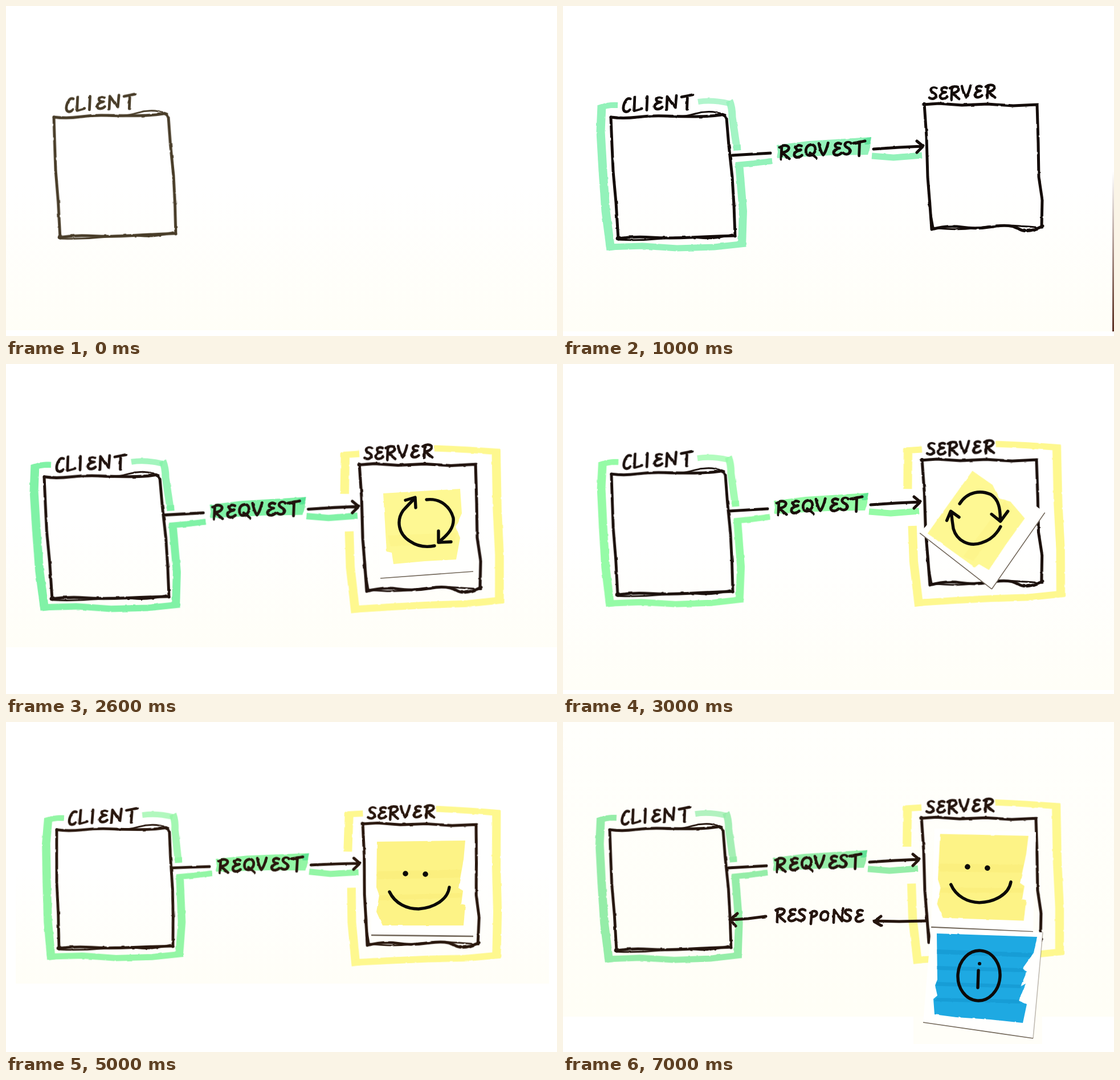
These frames come from a looping animation (967x579 px, 8 s). An HTML page:

```html
<!DOCTYPE html>
<html lang="en">
<head>
<meta charset="utf-8">
<title>Client and server</title>
<style>
  html, body { margin: 0; width: 100%; height: 100%; overflow: hidden; background: #fff; }
  svg { display: block; width: 100%; height: 100%; }
  path, ellipse { fill: none; stroke-linejoin: round; }
  .scene { visibility: hidden; animation: show 8s step-end infinite; }
  .scene.long { animation-name: showLong; }
  @keyframes show { 0% { visibility: visible; } 12.5%, 100% { visibility: hidden; } }
  @keyframes showLong { 0% { visibility: visible; } 25%, 100% { visibility: hidden; } }
  .ink { stroke: var(--ink); stroke-width: 5; stroke-linecap: round; filter: url(#rough); }
  .thin { stroke-width: 3; }
  .pen { stroke: #0c0a08; stroke-width: 5.4; stroke-linecap: round; }
  .marker { filter: url(#rough); }
  .green { stroke: var(--green); }
  .yellow { stroke: #fef88f; }
  .fill { stroke: none; }
  .sheet { fill: #fffffe; stroke: none; }
  .edge { stroke: #74695c; stroke-width: 1.6; }
</style>
</head>
<body>
<svg id="stage" viewBox="0 0 967 579" preserveAspectRatio="none">
  <defs>
    <filter id="rough" filterUnits="userSpaceOnUse" x="0" y="0" width="967" height="579" color-interpolation-filters="sRGB">
      <feTurbulence type="fractalNoise" baseFrequency=".08" numOctaves="2" seed="4"/>
      <feDisplacementMap in="SourceGraphic" scale="2.4" xChannelSelector="R" yChannelSelector="G"/>
    </filter>
    <linearGradient id="paper" x1="0" y1="0" x2="0" y2="1">
      <stop offset=".55" stop-color="#fff"/><stop offset="1" stop-color="#fffef7"/>
    </linearGradient>
    <linearGradient id="cream" x1="0" y1="0" x2="0" y2="1">
      <stop offset="0" stop-color="#fffffc"/><stop offset="1" stop-color="#fffef6"/>
    </linearGradient>
    <linearGradient id="fade" x1="0" y1="0" x2="0" y2="1">
      <stop offset="0" stop-color="#5a2f22" stop-opacity="0"/><stop offset="1" stop-color="#5a2f22"/>
    </linearGradient>
  </defs>
</svg>
<script>
// Hand lettering, one pen path per letter on a 26 unit high grid
const glyphs = {
  C: 'M16 2C11 0 8 3 5 10C2 18 2 25 8 26C12 26 14 24 16 22',
  L: 'M3 0L2 25L16 21',
  I: 'M2 0L1 25',
  E: 'M15 3C10 0 4 3 5 7C6 10 10 11 13 11C6 12 1 16 2 20C4 26 12 24 16 20',
  N: 'M1 26L2 2L17 23L19 0',
  T: 'M0 4L21 0M11 2L10 27',
  R: 'M4 2L3 26M0 4C8 -2 18 1 17 6C16 11 10 13 5 14L18 25',
  Q: 'M10 2C3 3 0 10 2 17C4 24 14 23 18 14C20 6 16 1 10 2M9 17L20 26',
  U: 'M0 1C2 10 4 18 8 22C12 18 15 8 17 0',
  V: 'M0 1C2 10 4 18 8 23C12 18 15 8 17 0',
  S: 'M14 3C8 -1 2 3 3 7C4 11 13 12 13 17C12 23 5 25 0 21',
  P: 'M3 6L1 29M0 7C8 2 14 5 12 11C10 15 5 15 2 16',
  O: 'M9 5C3 6 0 12 2 18C5 24 14 23 16 15C17 9 14 5 9 5'
};

const path = (cls, d, attrs = '') => `<path class="${cls}" d="${d}" ${attrs}/>`;
const ink = (d, cls = '') => path('ink ' + cls, d);
const stroke = (color, width, d, alpha = 1) =>
  path(color, d, `stroke-width="${width}" opacity="${alpha}"`);
const blob = (color, d, alpha = 1) => path('fill', d, `style="fill:${color}" opacity="${alpha}"`);
const group = (transform, body, cls = '') => `<g class="${cls}" transform="${transform}">${body}</g>`;

function word(text, xs, y, slope, size) {
  const letters = [...text].map((ch, i) => {
    const top = y + slope * (xs[i] - xs[0]);
    return `<path d="${glyphs[ch]}" transform="translate(${xs[i]} ${top}) scale(${size})"/>`;
  });
  return `<g class="ink" role="img" aria-label="${text}">${letters.join('')}</g>`;
}

// Affine map taking three points to three others
function fit(a, b) {
  const [ux, uy, vx, vy] = [a[2] - a[0], a[3] - a[1], a[4] - a[0], a[5] - a[1]];
  const det = ux * vy - uy * vx;
  const row = k => {
    const p = b[2 + k] - b[k], q = b[4 + k] - b[k];
    const m = (p * vy - q * uy) / det, n = (q * ux - p * vx) / det;
    return [m, n, b[k] - m * a[0] - n * a[1]];
  };
  const [r, s] = [row(0), row(1)];
  return `matrix(${[r[0], s[0], r[1], s[1], r[2], s[2]].map(v => v.toFixed(4))})`;
}
const square = ([x, y, p, q]) => [x, y, p, q, x + y - q, y + p - x];

const home = {
  client: [84, 195, 285, 192, 97, 409],
  server: [633, 171, 832, 173, 646, 392],
  wire: [297, 262, 632, 246]
};

const clientBox =
  ink('M84 195L86 245L88 290L93 345L97 409M281 191L287 197L291 245L297 300L300 350L302 404') +
  ink('M84 195Q105 198 130 195T180 193T232 194T278 191M96 408Q125 404 155 406T225 406T302 403') +
  ink('M180 193Q205 197 232 189T285 191M97 410Q135 412 175 408T240 407T297 401', 'thin') +
  word('CLIENT', [103, 123, 146, 159, 181, 208], 161, -.05, .95);

const clientGlow =
  stroke('green', 10, 'M96 174Q80 173 62 179') +
  stroke('green', 15, 'M68 175L66 220L70 290L75 360L84 429') +
  stroke('green', 11, 'M78 423L140 421L200 425L265 423L321 417') +
  stroke('green', 14, 'M314 421L316 360L309 276') +
  stroke('green', 10, 'M303 279L335 276L367 272') +
  stroke('green', 10, 'M237 168Q262 164 292 171', .72) +
  stroke('green', 13, 'M292 166Q297 178 297 195L305 249', .85) +
  stroke('green', 10, 'M86 174L96 174M299 249L312 248M358 273L367 272');

const wireGlow =
  blob('var(--green)', 'M375 244L430 237L541 230L539 248L535 261L470 262L375 267L377 256Z') +
  blob('#3fd98a', 'M527 233L541 230L538 243L530 243Z', .6) +
  stroke('green', 11, 'M542 263L580 266L630 262');

const wire =
  ink('M297 262L330 260L365 258M545 251L590 248L631 246M621 237L632 246L621 257') +
  word('REQUEST', [380, 404, 425, 449, 473, 492, 510], 244, -.055, .96);

const serverBox =
  ink('M632 173L660 171L700 174L745 172L790 175L832 173L834 240L835 300L841 340L840 388') +
  ink('M634 171L638 230L640 300L644 350L647 392Q675 384 700 388T755 387T800 391T842 386') +
  ink('M642 345L650 389Q690 394 720 390T765 385T841 389', 'thin') +
  word('SERVER', [643, 660, 679, 700, 721, 742], 142, -.04, .9);

const serverGlow =
  stroke('yellow', 11, 'M634 154L603 156M762 145Q815 147 874 152') +
  stroke('yellow', 15, 'M610 153L609 223M617 288L619 350L628 429M867 149L869 250L873 330L873 412') +
  stroke('yellow', 12, 'M622 423L690 419L753 416L820 414L880 408');

const loopCard = (sides = '') =>
  path('sheet', 'M654 216L814 222L820 364L657 376Z') +
  group('', blob('#fef893', 'M662 227L797 219L800 262L789 286L797 305L790 343L735 346L680 351L677 331L668 329Z') +
    blob('#f9ee7c', 'M670 301L792 296L786 315L675 320Z', .3), 'marker') +
  path('edge', 'M657 376L820 364' + sides) +
  path('pen', 'M752 319Q728 324 709 311C688 298 685 274 697 257Q706 247 717 236M701 239L718 234L719 252') +
  path('pen', 'M738 238C764 235 780 252 785 270C787 287 776 299 760 312M759 293L759 313L781 312');

const smileCard =
  path('sheet', 'M641 201L819 201L820 376L641 374Z') +
  group('', blob('#fdf386', 'M651 210L806 208L803 242L794 292L802 297L799 319L806 321L803 357L661 357L650 333L655 304L650 290Z') +
    blob('#f8e971', 'M653 262L799 259L796 273L652 276ZM655 304L800 300L799 308L654 313Z', .4), 'marker') +
  path('edge', 'M641 374L820 376', 'style="stroke-width:2.6"') +
  path('pen', 'M673 298C683 319 704 328 724 328C751 326 775 312 778 290') +
  path('pen', 'M701 266h.1M736 267h.1', 'style="stroke-width:9.5"');

const infoCard =
  path('sheet', 'M646 361L842 369L825 555L632 527Z') +
  path('edge', 'M632 527L825 555') +
  path('edge', 'M842 369L825 555', 'opacity=".45"') +
  group('', blob('#1ea9e2', 'M656 371L832 377L826 405L806 433L814 438L803 464L812 459L800 489L814 495L807 528L750 522L690 518L652 513L650 486L657 480L653 462L657 452Z') +
    blob('#0e8fc8', 'M656 399L824 405L821 413L656 407ZM656 428L806 432L810 439L656 435ZM655 456L805 461L803 467L655 463ZM655 484L800 487L803 494L652 490Z', .45), 'marker') +
  '<ellipse class="pen" cx="730" cy="445" rx="37" ry="44" transform="rotate(4 730 445)"/>' +
  path('pen', 'M731 424h.1', 'style="stroke-width:6"') + path('pen', 'M729 436L728 466');

const response =
  ink('M356 341L325 345L294 347M306 336L293 347L303 358M636 349L590 350L546 349M558 341L546 350L558 357') +
  word('RESPONSE', [373, 394, 412, 434, 451, 474, 493, 512], 327, .01, .92);

const turn = (x, y, deg) => `translate(${x} ${y}) rotate(${deg}) translate(-738 -279)`;

const scenes = [
  { at: 0, ink: '#493d29', paper: [0, 0, 967, 569], client: [84, 195, 283, 190, 95, 407] },
  { at: 1, ink: '#140c09', green: '#93f2ba', paper: [0, 0, 967, 571],
    client: home.client, wire: home.wire, server: home.server,
    top: '<rect x="964" y="290" width="3" height="281" fill="url(#fade)"/>' },
  { at: 2, ink: '#21130e', green: '#80f2a6', paper: [0, 0, 967, 497], lit: true,
    client: [67, 198, 268, 196, 81, 413], wire: [278, 265, 619, 250],
    server: [619, 175, 824, 176, 632, 399], top: loopCard() },
  { at: 3, ink: '#1b100c', green: '#95fba6', paper: [0, 0, 967, 572], lit: true,
    client: [85, 193, 283, 189, 96, 406], wire: [292, 258, 627, 242],
    server: [629, 167, 831, 168, 643, 388],
    top: group(turn(728, 271, -51), loopCard('M654 216L657 376')) },
  { at: 4, ink: '#26150d', green: '#96faa6', paper: [11, 0, 944, 459], lit: true,
    client: [89, 189, 286, 188, 92, 399], wire: [292, 259, 625, 252],
    server: [628, 179, 831, 184, 635, 400], top: group(turn(737, 293, 6.5), loopCard()) },
  { at: 5, long: true, ink: '#29170d', green: '#93f6a5', paper: [17, 0, 936, 459], lit: true,
    client: [89, 189, 285, 187, 93, 398], wire: [291, 256, 621, 248],
    server: [625, 177, 825, 180, 633, 392], top: smileCard },
  { at: 7, ink: '#25150e', green: '#95eda8', paper: [0, 0, 967, 517], tone: 'cream', lit: true,
    client: [82, 189, 279, 185, 94, 402], wire: [290, 256, 625, 241],
    server: [628, 167, 830, 169, 641, 387],
    top: group('translate(735 279) rotate(2) translate(-727 -290)', smileCard) + response +
      '<rect x="615" y="517" width="226" height="48" fill="#fffef8"/>' + infoCard }
];

function draw(s) {
  const [x, y, w, h] = s.paper;
  const place = (name, body, cls) => group(fit(home[name], s[name]), body, cls);
  const link = (body, cls) => group(fit(square(home.wire), square(s.wire)), body, cls);
  let out = `<rect width="967" height="579" fill="#fff"/>
    <rect x="${x}" y="${y}" width="${w}" height="${h}" fill="url(#${s.tone || 'paper'})"/>`;
  if (s.green) out += place('client', clientGlow, 'marker') + link(wireGlow, 'marker');
  if (s.lit) out += place('server', serverGlow, 'marker');
  out += place('client', clientBox);
  if (s.wire) out += link(wire) + place('server', serverBox);
  return `<g class="scene${s.long ? ' long' : ''}"
    style="--ink:${s.ink};--green:${s.green || 'none'};animation-delay:${s.at}s">${out}${s.top || ''}</g>`;
}

document.getElementById('stage').insertAdjacentHTML('beforeend', scenes.map(draw).join(''));
</script>
</body>
</html>
```
